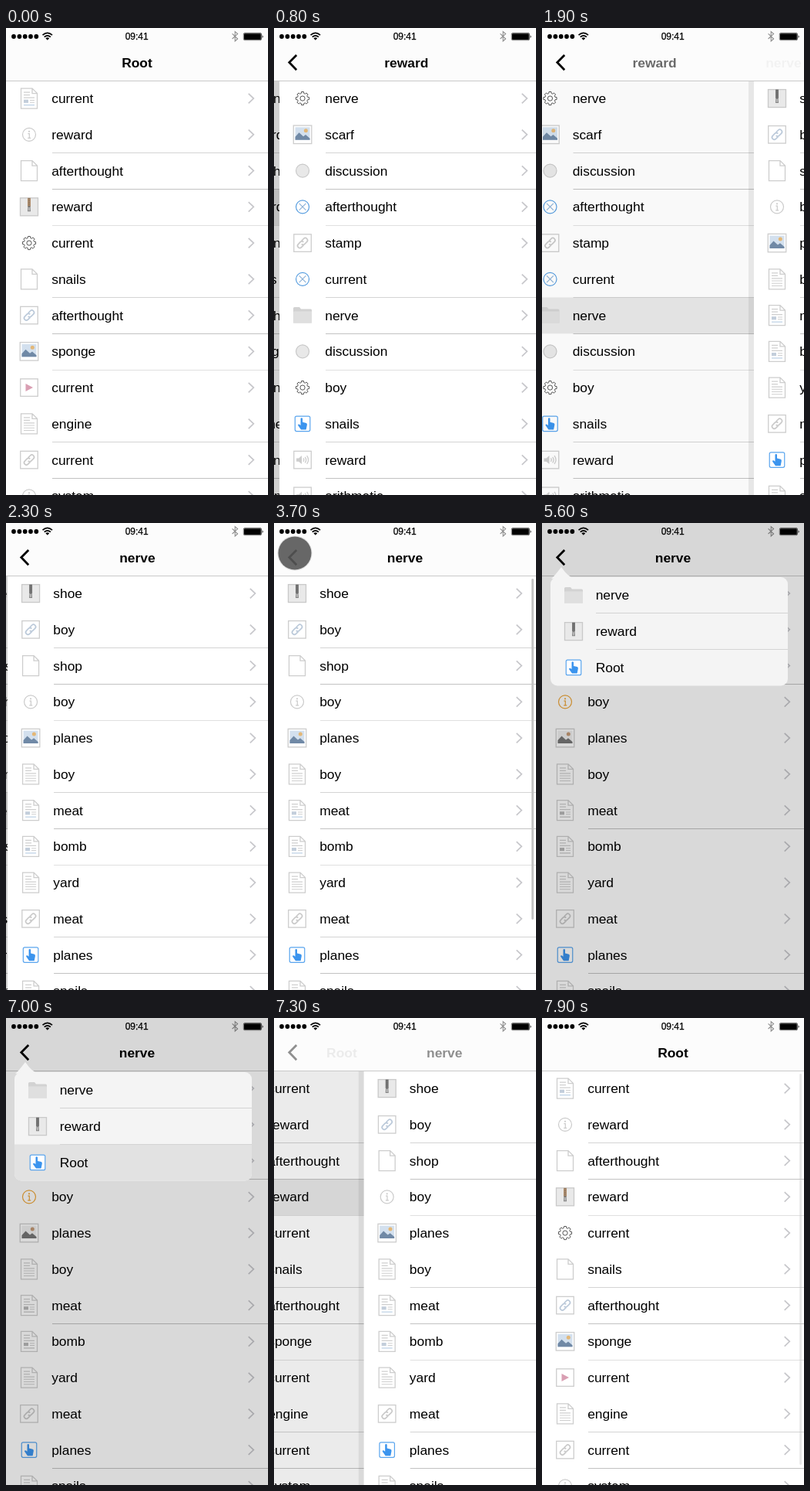
These frames come from a looping animation (340 px wide and 604 px high, 8 s). An HTML page:

```html
<!DOCTYPE html>
<html lang="en">
<head>
<meta charset="utf-8">
<title>Navigation stack</title>
<style>
  html, body { margin: 0; width: 100%; height: 100%; overflow: hidden; background: #fff; }
  svg { display: block; width: 100%; height: 100%; }
  text { font: 17.4px "Liberation Sans", Arial, sans-serif; fill: #000; }
  .title { font-size: 17.4px; font-weight: 700; text-anchor: middle; }
  .clock { font-size: 12px; text-anchor: middle; stroke: #000; stroke-width: .25; }
  .line { fill: none; stroke: #cdcdcd; stroke-width: 1.3; }
  .thin { fill: none; stroke: #cfcfcf; stroke-width: 1.1; }
  .chev { fill: none; stroke: #c7c7cb; stroke-width: 1.7; }
  .info { fill: none; stroke: #cbcbcb; stroke-width: 1.2; }
  .dot { fill: #cbcbcb; }
  .chain { fill: none; stroke: #cacaca; stroke-width: 1.7; }
  .tinted { stroke: #bccada; }
  .sky { fill: #d3e0ee; }
  .hill { fill: #7089a6; }
  .sun { fill: #e3b777; }
  .tint { stroke: #b4cbe2; }
  .block { fill: #c3cedb; }
  .dim .info { stroke: #eda63a; }
  .dim .dot { fill: #eda63a; }
  .dim .tinted, .dim .tint { stroke: #bdbdbd; }
  .dim .sky { fill: #f0f0f0; }
  .dim .hill { fill: #777; }
  .dim .sun { fill: #c49a76; }
  .dim .block { fill: #b8b8b8; }
  .dim .faint { visibility: hidden; }
</style>
</head>
<body>
<svg id="stage" viewBox="0 0 340 604" preserveAspectRatio="none"></svg>
<script>
const LOOP = 8000, STEP = 100, ROW = 46.75, TOP = 68;
const stage = document.getElementById('stage');

// ---- icons, all centred on 0,0 ----
const path = (d, cls = 'line', extra = '') => `<path class="${cls}" d="${d}" ${extra}/>`;
const box = (s, cls = 'line', extra = '') =>
  `<rect class="${cls}" x="${-s / 2}" y="${-s / 2}" width="${s}" height="${s}" ${extra}/>`;

function gearPath() {
  const pts = [];
  for (let i = 0; i < 8; i++) {
    for (const [off, r] of [[-.27, 6.7], [-.17, 8.7], [.17, 8.7], [.27, 6.7]]) {
      const a = i * Math.PI / 4 + off;
      pts.push((r * Math.sin(a)).toFixed(2) + ' ' + (-r * Math.cos(a)).toFixed(2));
    }
  }
  return 'M' + pts.join('L') + 'Z';
}

const paper = path('M-10.5-13H4L10.5-6.5V13H-10.5ZM4-13V-6.5H10.5');
const chain = cls => box(22.5) + `<g class="chain ${cls}" transform="rotate(-45)">
  <path d="M-1 2.9H-5A2.9 2.9 0 0 1-5-2.9H-1A2.9 2.9 0 0 1 1.8 0M1-2.9H5A2.9 2.9 0 0 1 5 2.9H1A2.9 2.9 0 0 1-1.8 0"/></g>`;
const zip = top => box(23, 'line', 'style="fill:#e9e9e9;stroke:#c9c9c9"') +
  `<path d="M-2-11.5H2V0H-2Z" fill="${top}"/><path d="M-1.5-1H1.5L2 6H-2Z" fill="#858585"/>` +
  path('M0-11V0', 'thin', 'style="stroke:#5c5c5c;stroke-dasharray:1 1.4"') +
  path('M0 1V5', 'thin', 'style="stroke:#ddd"');

const icons = {
  file: paper,
  text: paper + path('M-7-8H1M-7-4.5H1M-7-1H7M-7 2.2H7M-7 5.4H7M-7 8.6H7', 'thin'),
  rich: paper + path('M-7-8H1M-7-4.5H1M-7-1H7M1 2.4H7M1 5.2H7', 'thin') +
    '<rect class="block" x="-7" y="1.6" width="6" height="4.2"/>' + path('M-7 8.6H7', 'thin tint'),
  info: '<circle class="info" r="8.5"/><circle class="dot" cy="-4" r="1.1"/>' +
    path('M-1.6-1.2H.3V4.5M-1.8 4.5H2.2', 'info'),
  zip: zip('#777'),
  brownzip: zip('#b08d6c'),
  gear: path(gearPath(), '', 'fill="none" stroke="#555" stroke-linejoin="round"') +
    '<circle r="3.1" fill="none" stroke="#555"/>',
  link: chain(''),
  bluelink: chain('tinted'),
  image: box(23.5, 'line', 'style="fill:#fff"') + '<rect class="sky" x="-9.5" y="-9.5" width="19" height="16.5"/>' +
    '<circle class="sun" cx="4.3" cy="-5.2" r="2.5"/>' +
    path('M-9.5 7V3L-4.5-2.5L1 2.5L4 .2L9.5 5V7Z', 'hill'),
  play: box(22.5) + '<path d="M-4.5-5L5 0L-4.5 5Z" fill="#d99fb3"/>',
  disc: '<circle r="8.5" fill="#e8e8e8" stroke="#c9c9c9" stroke-width="1.2"/>',
  cross: '<circle r="8.5" fill="#fff" stroke="#5a9fe0" stroke-width="1.2"/>' +
    path('M-4.4-4.4L4.4 4.4M4.4-4.4L-4.4 4.4', '', 'stroke="#8ab0d6" stroke-width="1.1"'),
  folder: path('M-12 10V-9Q-12-10.5-10.5-10.5H-4L-2-8H10.5Q12-8 12-6.5V10Z', '', 'fill="#d2d2d2"') +
    '<rect x="-12" y="-5" width="24" height="15" rx="1" fill="#dfdfdf"/>',
  hand: box(19.5, '', 'rx="2" fill="#fff" stroke="#5aa5ee" stroke-width="1.2"') +
    path('M-2.5-7Q-1.2-8.2 0-7V-2L4.8-.8Q6.2-.2 5.8 1.6L4.6 7.6H-2L-6 2Q-5.8.2-4 1L-2.5 2.2Z', '', 'fill="#3b94ee"'),
  sound: box(22.5) + path('M-8-2.2H-5L-1-5.5V5.5L-5 2.2H-8Z', '', 'fill="#cdcdcd"') +
    path('M1-2.2Q2.6 0 1 2.2M3.2-3.8Q6 0 3.2 3.8M5.6-5.4Q9.4 0 5.6 5.4')
};
const icon = (name, x, y) => `<g transform="translate(${x} ${y})">${icons[name]}</g>`;

// ---- screens ----
const lists = {
  Root: {
    rows: 'current:rich reward:info afterthought:file reward:brownzip current:gear snails:file ' +
      'afterthought:bluelink sponge:image current:play engine:text current:link system:info',
    picked: 3, bar: 506
  },
  reward: {
    rows: 'nerve:gear scarf:image discussion:disc afterthought:cross stamp:link current:cross ' +
      'nerve:folder discussion:disc boy:gear snails:hand reward:sound arithmetic:sound',
    picked: 6, bar: 470
  },
  nerve: {
    rows: 'shoe:zip boy:bluelink shop:file boy:info planes:image boy:text ' +
      'meat:rich bomb:rich yard:text meat:link planes:hand snails:text',
    picked: 0, bar: 441
  }
};

function row(entry, k) {
  const [label, kind] = entry.split(':');
  const y = TOP + ROW * (k + .5) - .3;
  const weight = [0, .7, 1, .5][k % 4];
  return `<rect class="${k % 4 === 2 ? '' : 'faint'}" x="60" y="${Math.floor(TOP + ROW * (k + 1))}" width="280" height="1" fill="#c2c2c2" opacity="${weight}"/>` +
    icon(kind, 30, y) + `<text x="59.2" y="${y + 6}">${label}</text>` +
    path(`M314.7 ${y - 6.2}L321.3 ${y}L314.7 ${y + 6.2}`, 'chev');
}

function screen(name) {
  const { rows, picked, bar } = lists[name];
  return `<g id="${name}">
    <rect x="-7" y="${TOP}" width="7" height="536" opacity=".07"/>
    <rect y="${TOP}" width="340" height="536" fill="#fff"/>
    <rect class="pick" y="${TOP + ROW * picked}" width="340" height="${ROW}" fill="#e8e8e8" opacity="0"/>
    ${rows.split(' ').map(row).join('')}
    <rect class="bar" x="334.2" y="72" width="2.8" height="${bar}" rx="1.4" fill="#c2c2c2" opacity="0"/>
    <rect class="shade" y="${TOP}" width="340" height="536" opacity="0"/>
  </g>`;
}

const names = Object.keys(lists);
const dots = [10, 17.4, 24.7, 32, 39.3].map(x => `<circle cx="${x}" cy="11" r="2.9"/>`).join('');
const status = dots +
  path('M47.5 9.2Q53.8 3.6 60 9.2M49.7 11.6Q53.8 8 57.9 11.6', '', 'fill="none" stroke="#000" stroke-width="1.7"') +
  '<path d="M51.4 13.2Q53.8 11.4 56.2 13.2L53.8 15.8Z"/>' +
  '<text class="clock" x="169.7" y="15.2">09:41</text>' +
  path('M293.6 7.4L300.6 14L297.2 17V4.6L300.6 7.6L293.6 14', '', 'fill="none" stroke="#8e8e8e" stroke-width="1.1"') +
  '<rect x="308.3" y="6.5" width="23.2" height="9.2" rx="1.5" fill="none" stroke="#000" stroke-width=".6"/>' +
  '<rect x="309" y="7.2" width="21.8" height="7.8" rx=".8"/><path d="M332.6 9.2Q334.6 11.1 332.6 13Z"/>';

const menu = ['nerve:folder', 'reward:zip', 'Root:hand'].map((entry, k) => {
  const [label, kind] = entry.split(':');
  const y = 93.4 + ROW * k;
  return icon(kind, 41, y) + `<text x="69.7" y="${y + 6}">${label}</text>` +
    (k < 2 ? `<rect x="70" y="${Math.floor(y + 23.4)}" width="249" height="1" fill="#d4d4d4"/>` : '');
}).join('');

stage.innerHTML = `
  <clipPath id="round"><rect x="11" y="70" width="308" height="140.5" rx="9"/></clipPath>
  ${names.map(screen).join('')}
  <rect width="340" height="68" fill="#fcfcfc"/>
  <rect y="68" width="340" height="1" fill="#c9c9c9"/>
  ${status}
  ${names.map(n => `<text class="title" id="title-${n}" y="51">${n}</text>`).join('')}
  <path id="back" d="M29.2 35L19.8 44.6L29.2 54.2" fill="none" stroke="#000" stroke-width="2.8"/>
  <rect id="veil" width="340" height="604" opacity="0"/>
  <g id="menu">
    <path d="M12 72Q16 69 25 57Q34 70 41 71Z" fill="#f4f4f4"/>
    <rect x="11" y="70" width="308" height="140.5" rx="9" fill="#f4f4f4"/>
    <rect id="choice" x="11" y="163.5" width="308" height="47" fill="#e2e2e2" clip-path="url(#round)"/>
    ${menu}
  </g>
  <g id="touch"><circle cx="27" cy="39" r="22.6" opacity=".1"/><circle cx="27" cy="39" r="21.5" opacity=".54"/></g>`;

// ---- motion ----
const PUSH1 = 438, PUSH2 = 1850, POP = 7224;
const el = id => document.getElementById(id);
const part = (name, cls) => el(name).querySelector('.' + cls);
const fade = (node, v) => node.setAttribute('opacity', v);

// critically damped spring
function spring(ms) {
  const x = ms * .016;
  if (x <= 0) return 0;
  return x > 8.6 ? 1 : 1 - (1 + x) * Math.exp(-x);
}

// piecewise linear track of [time, value] points
function track(t, pts) {
  if (t <= pts[0][0]) return pts[0][1];
  for (let i = 1; i < pts.length; i++) {
    const [a, u] = pts[i - 1], [b, v] = pts[i];
    if (t <= b) return u + (v - u) * (t - a) / (b - a);
  }
  return pts[pts.length - 1][1];
}

function place(name, x, shade, shown) {
  el(name).setAttribute('visibility', shown ? 'visible' : 'hidden');
  el(name).setAttribute('transform', `translate(${x} 0)`);
  fade(part(name, 'shade'), shade);
}

function title(name, x, alpha) {
  el('title-' + name).setAttribute('x', x);
  fade(el('title-' + name), alpha);
}

function draw(t) {
  let under = 'Root', over = 'reward', p = spring(t - PUSH1);
  if (t >= POP) { over = 'nerve'; p = 1 - spring(t - POP); }
  else if (t >= PUSH2) { under = 'reward'; over = 'nerve'; p = spring(t - PUSH2); }

  for (const n of names) { place(n, 0, 0, false); title(n, 170, 0); }
  place(under, -102 * p, .12 * p, p < 1);
  place(over, 340 * (1 - p), 0, p > 0);
  title(under, 170 - 125 * p, (1 - p) ** 2.6);
  title(over, 170 + 185 * (1 - p) ** 1.2, p * p);

  const pressed = t >= 3300 && t < 3900;
  fade(el('back'), pressed ? .25 : under === 'reward' ? 1 : p * p);

  fade(part('Root', 'pick'), t < 200 ? 0 : track(t, [[7300, 1], [7600, 0]]));
  fade(part('reward', 'pick'), t < 1800 ? 0 : 1);
  fade(part('Root', 'bar'), track(t, [[7600, 0], [7700, 1], [7800, .8], [7900, .4], [8000, 0]]));
  fade(part('reward', 'bar'), track(t, [[800, 0], [900, 1], [1050, 1], [1500, 0]]));
  fade(part('nerve', 'bar'), track(t, [[2300, 0], [2400, 1], [2600, 1], [3000, 0], [3200, 0], [3300, 1], [3700, 1], [3900, 0]]));

  const open = track(t, [[3700, 0], [3800, .6], [3900, 1], [7000, 1], [7100, .5], [7200, 0]]);
  fade(el('veil'), .15 * open);
  fade(el('menu'), open);
  fade(el('choice'), t >= 6900 ? 1 : 0);
  fade(el('touch'), track(t, [[3200, 0], [3300, .5], [3400, 1], [4300, 1], [4600, 0]]));
  stage.classList.toggle('dim', t >= 3900 && t < 7100);
}

function tick(now) {
  draw(Math.floor(now % LOOP / STEP) * STEP);
  requestAnimationFrame(tick);
}
draw(0);
requestAnimationFrame(tick);
</script>
</body>
</html>
```
